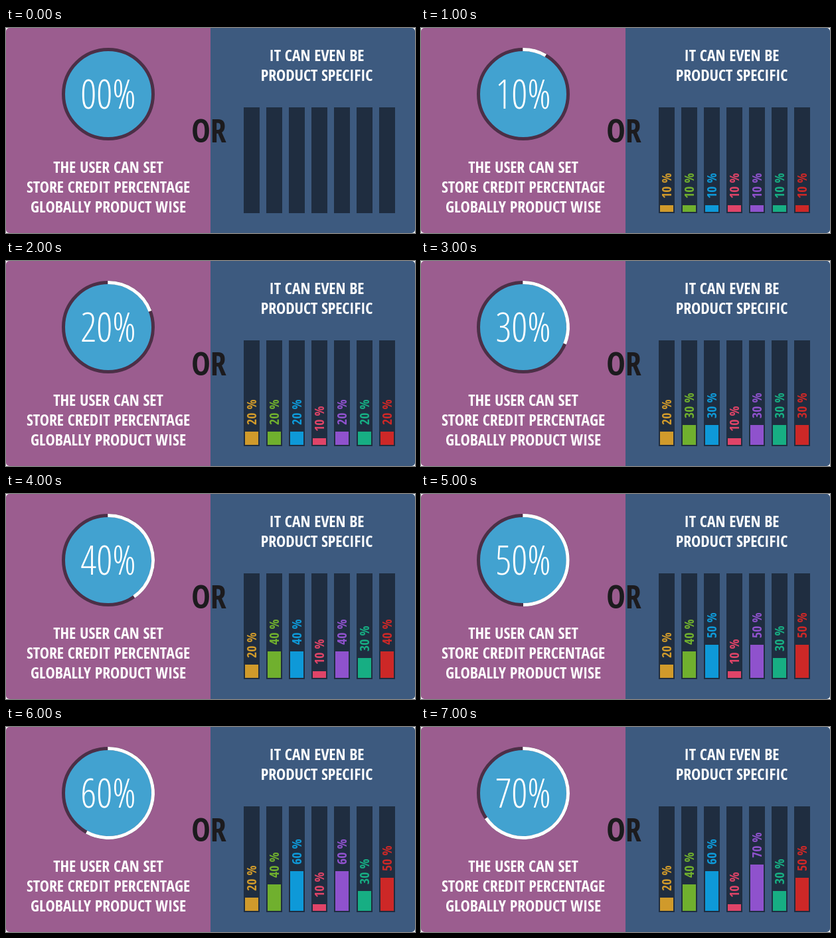
Animation of 616 by 310 pixels, one loop 8 s. Source, as an HTML page:

```html
<!DOCTYPE html>
<html lang="en">
<head>
<meta charset="utf-8">
<title>Store credit</title>
<style>
  html, body { margin: 0; width: 100%; height: 100%; overflow: hidden; background: #fff; }
  svg { display: block; width: 616px; height: 310px; }
  text { font-family: "Open Sans", sans-serif; font-stretch: 75%; font-weight: 700; }
  .line { letter-spacing: -0.1px; }
</style>
</head>
<body>
<svg id="stage" viewBox="0 0 616 310" xmlns="http://www.w3.org/2000/svg">
  <clipPath id="card"><rect width="616" height="310" rx="5"/></clipPath>
  <g clip-path="url(#card)">
    <rect width="308" height="310" fill="#9b5d8f"/>
    <rect x="308" width="308" height="310" fill="#3d5a7f"/>
  </g>
  <circle cx="154" cy="100" r="67.5" fill="#42a2d0" stroke="#4c2f47" stroke-width="5"/>
  <path id="arc" fill="none" stroke="#fff" stroke-width="5"/>
</svg>
<script>
const stage = document.getElementById('stage');
const arc = document.getElementById('arc');
const STEP = 1000, STEPS = 8;
const ANGLES = [0, 30, 69, 112, 145, 180, 209, 236];
const BARS = [
  ['#d09a2b', 20], ['#70b02e', 40], ['#0e99d8', 60], ['#e04468', 10],
  ['#8f52cd', 70], ['#17ae83', 30], ['#cd2827', 50]
];

function add(tag, attrs, content = '') {
  const el = document.createElementNS('http://www.w3.org/2000/svg', tag);
  for (const key in attrs) el.setAttribute(key, attrs[key]);
  el.textContent = content;
  return stage.appendChild(el);
}

// Pick a family that has a condensed cut; narrow the regular cut if none does.
function findFace(weight, narrow) {
  const probe = add('text', { 'font-size': 100 }, '0000');
  probe.style.fontWeight = weight;
  let face = { family: '"Open Sans", sans-serif', weight, scale: narrow };
  for (const name of ['Open Sans', 'Open Sans Condensed', 'Open Sans Condensed Light']) {
    const family = `"${name}", sans-serif`;
    probe.style.fontFamily = family;
    if (probe.getComputedTextLength() < 212) {
      face = { family, weight, scale: 1 };
      break;
    }
  }
  probe.remove();
  return face;
}

const bold = findFace(700, 0.8);
const light = findFace(300, 0.71);

function place(el, x, y, face, turn = 0) {
  el.setAttribute('transform', `translate(${x} ${y}) rotate(${turn}) scale(${face.scale} 1)`);
}

function label(content, x, y, size, face, fill = '#fff', anchor = 'middle') {
  const el = add('text', { 'font-size': size, fill, 'text-anchor': anchor }, content);
  el.style.fontFamily = face.family;
  el.style.fontWeight = face.weight;
  place(el, x, y, face);
  return el;
}

function lines(rows, x, y) {
  rows.forEach((row, i) => label(row, x, y + 30 * i, 24, bold).classList.add('line'));
}

lines(['THE USER CAN SET', 'STORE CREDIT PERCENTAGE', 'GLOBALLY PRODUCT WISE'], 154, 219);
lines(['IT CAN EVEN BE', 'PRODUCT SPECIFIC'], 468, 50);
label('OR', 305.5, 173, 48, bold, '#1c1b1e');
const total = label('', 154, 122, 60, light);

const bars = BARS.map(([fill, limit], i) => {
  const x = 358 + 34 * i;
  add('rect', { x, y: 120, width: 24, height: 160, fill: '#1f2d40' });
  return {
    x, limit,
    level: add('rect', { x: x + 2, width: 20, fill }),
    text: label('', 0, 0, 20, bold, fill, 'start')
  };
});

function draw(step) {
  const percent = step * 10;
  total.textContent = percent ? percent + '%' : '00%';

  const a = ANGLES[step] * Math.PI / 180;
  const x = 154 + 67.5 * Math.sin(a), y = 100 - 67.5 * Math.cos(a);
  arc.setAttribute('d', step ? `M153.3 32.5A67.5 67.5 0 ${a > 3.13 ? 1 : 0} 1 ${x} ${y}` : '');

  for (const bar of bars) {
    const value = Math.min(percent, bar.limit);
    const top = 278 - value;
    bar.level.setAttribute('y', top);
    bar.level.setAttribute('height', value);
    bar.text.textContent = value ? value + ' %' : '';
    place(bar.text, bar.x + 19, top - 10, bold, -90);
  }
}

let shown = -1;
const start = performance.now();
function tick(now) {
  const step = Math.floor(Math.max(0, now - start) / STEP) % STEPS;
  if (step !== shown) draw(shown = step);
  requestAnimationFrame(tick);
}
tick(start);
</script>
</body>
</html>
```
